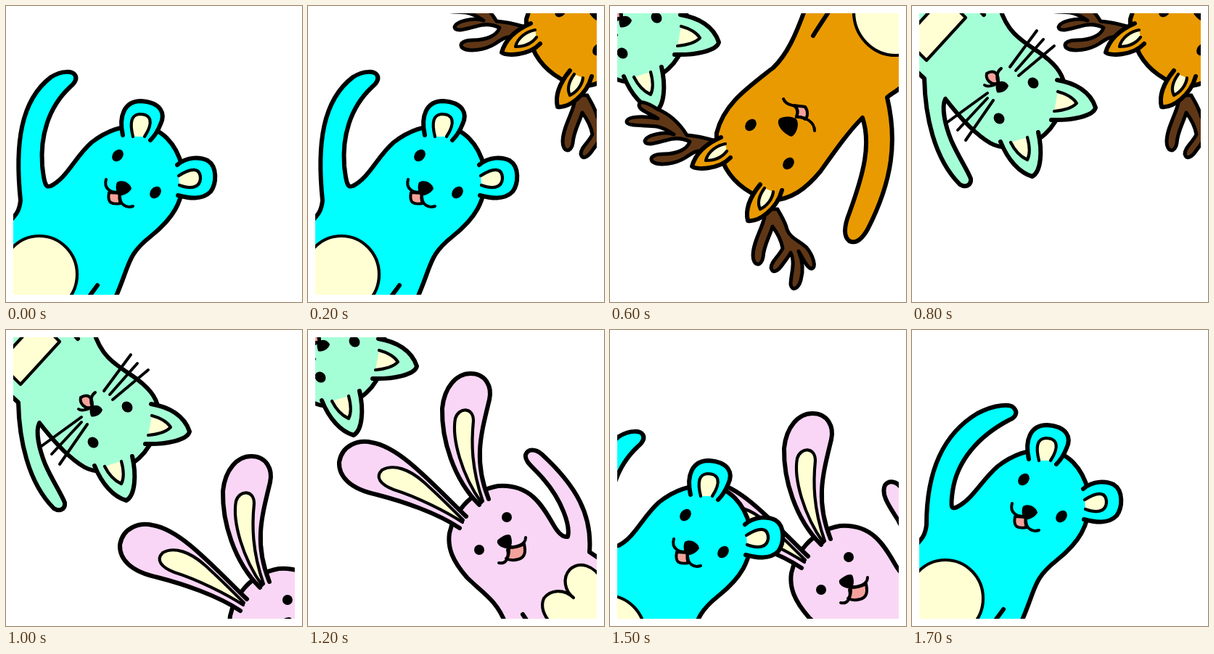
Animation of 408x408 px, one loop 1.8 s. Source, as an HTML page:

```html
<!DOCTYPE html>
<html lang="en">
<head>
<meta charset="utf-8">
<title>Waving animals</title>
<style>
  html, body { margin: 0; width: 100%; height: 100%; overflow: hidden; background: #fff; }
  body > svg { display: block; width: 100vw; height: 100vh; }

  path, ellipse { stroke: #000; stroke-width: 6; stroke-linecap: round; stroke-linejoin: round; }
  .skin { fill: var(--skin); }
  .cream { fill: #ffffd3; stroke-width: 4.2; }
  .tongue { fill: #f5a29c; stroke-width: 4; }
  .horn { fill: #5f3716; stroke-width: 5; }
  .ink { stroke: none; }
  .line { fill: none; }
  .thin { fill: none; stroke-width: 4; }

  .animal { animation: slide 1.8s step-end var(--at) infinite; }
  .rest { animation: rest 1.8s step-end var(--at) infinite; }
  .wave { animation: wave 1.8s step-end var(--at) infinite; }

  .bear   { --skin: #0ff;    --at: -.4s;  --in: -50px, 49px;     --in2: -100px, 98px;  --out: -57px, 54px;     --out2: -114px, 109px; animation-name: linger; }
  .deer   { --skin: #e99a00; --at: -1.6s; --in: 77px, -78px;     --in2: 154px, -157px; --out: 77px, -78px;     --out2: 154px, -157px; }
  .cat    { --skin: #a5ffd6; --at: -1.2s; --in: -52px, -45px;    --in2: -103px, -90px; --out: -52px, -45px;    --out2: -103px, -90px; }
  .rabbit { --skin: #f9d6f5; --at: -.8s;  --in: 57px, 57px;      --in2: 114px, 114px;  --out: 55px, 55px;      --out2: 110px, 110px; }

  /* one step is an eighteenth of the loop */
  @keyframes slide {
    0%     { transform: translate(var(--in2)); }
    5.555% { transform: translate(var(--in)); }
    11.11% { transform: none; }
    27.77% { transform: translate(var(--out)); }
    33.33% { transform: translate(var(--out2)); }
    38.88%, 100% { transform: translate(900px, 0); }
  }
  @keyframes linger {
    0%     { transform: translate(var(--in2)); }
    5.555% { transform: translate(var(--in)); }
    11.11% { transform: none; }
    38.88% { transform: translate(var(--out)); }
    44.44% { transform: translate(var(--out2)); }
    49.99%, 100% { transform: translate(900px, 0); }
  }
  @keyframes rest {
    0%, 22.22%, 33.33%, 100% { opacity: 1; }
    16.66%, 27.77% { opacity: 0; }
  }
  @keyframes wave {
    0%, 22.22%, 33.33%, 100% { opacity: 0; }
    16.66%, 27.77% { opacity: 1; }
  }
</style>
</head>
<body>
<svg viewBox="0 0 408 408">
<svg x="10" y="10" width="388" height="388" viewBox="10 10 388 388">

  <g class="animal rabbit">
    <path class="skin rest" d="M272 404C260 372 240 362 219 341C199 318 192 300 195 280C200 255 222 222 262 215C305 212 322 240 338 268C346 282 352 286 358 285C362 270 350 235 325 206C312 190 298 182 300 172C303 163 314 164 322 171C370 215 392 255 388 306L406 318V404Z"/>
    <path class="skin wave" d="M272 404C260 372 240 362 219 341C199 318 192 300 195 280C200 255 222 222 262 215C305 212 322 240 338 268C346 282 352 286 358 285C362 265 358 235 342 207C330 188 318 172 324 159C330 151 340 154 346 162C380 205 394 255 388 306L406 318V404Z"/>
    <path class="skin" d="M236 241C200 205 184 150 185 108C188 78 205 60 224 60C245 60 254 78 250 96C238 145 228 180 249 233"/>
    <path class="cream" d="M239 238C212 200 198 150 203 122C208 106 228 106 228 125C225 155 225 190 241 236"/>
    <path class="skin" d="M209 273C178 252 130 236 95 227C58 219 42 202 43 182C47 158 70 151 88 155C125 161 165 205 218 257"/>
    <path class="cream" d="M213 265C190 250 150 230 118 220C100 213 92 203 102 193C118 184 140 192 160 210C180 228 198 246 214 262"/>
    <path class="cream" d="M406 345C394 324 374 318 361 330C350 342 354 360 366 369C352 356 334 358 325 370C320 382 325 394 336 406H406Z"/>
    <path class="line" d="M296 392L304 404"/>
    <ellipse class="ink" cx="274" cy="258" rx="7" ry="7"/>
    <ellipse class="ink" cx="236" cy="303" rx="7" ry="7"/>
    <path class="tongue" d="M277 300C285 300 294 297 298 295C300 305 300 313 290 316C283 318 277 317 273 315C277 312 277 306 277 300Z"/>
    <path class="thin" d="M300 286C300 296 288 299 279 299M263 321C272 323 278 315 275 303"/>
    <path class="ink" d="M261 290C267 284 276 280 279 283C283 292 280 300 277 301C270 302 259 297 261 290Z"/>
  </g>

  <g class="animal cat">
    <path class="skin rest" d="M121 2C131 36 150 47 174 63C197 79 207 92 210 108C211 135 201 166 174 184C155 197 124 198 108 189C84 175 63 150 46 128C40 140 46 165 54 185C64 208 76 225 81 238C82 247 74 251 66 246C30 210 18 150 17 100L2 86V2Z"/>
    <path class="skin wave" d="M121 2C131 36 150 47 174 63C197 79 207 92 210 108C211 135 201 166 174 184C155 197 124 198 108 189C84 175 63 150 46 128C44 142 58 165 74 182C90 200 106 212 114 222C118 231 110 238 101 234C50 205 20 155 17 100L2 86V2Z"/>
    <path class="skin" d="M200 102C225 106 246 118 253 140C250 152 220 158 192 157"/>
    <path class="cream" d="M201 118C212 121 222 126 227 134C220 141 208 144 196 145"/>
    <path class="skin" d="M122 187C132 212 148 230 166 235C178 228 180 200 174 174"/>
    <path class="cream" d="M136 188C142 200 150 208 159 212C163 204 162 192 159 181"/>
    <path class="cream" d="M74 16L20 75L-10 45L44 -14Z"/>
    <path class="line" d="M92 4L99 12"/>
    <path class="thin" d="M172 34L135 84M181 46L143 89M196 55L147 96M104 120L49 160M104 127L63 171M112 130L74 185"/>
    <ellipse class="ink" cx="167" cy="106" rx="7" ry="8" transform="rotate(-42 167 106)"/>
    <ellipse class="ink" cx="120" cy="155" rx="7" ry="8" transform="rotate(-42 120 155)"/>
    <path class="tongue" d="M118 107C108 109 101 101 103 93C111 88 119 90 119 104Z"/>
    <path class="thin" d="M123 86C116 91 116 98 119 106M100 109C104 112 112 110 118 106"/>
    <path class="ink" d="M117 106C124 101 131 105 133 110C131 117 122 121 117 119C115 113 115 109 117 106Z"/>
  </g>

  <g class="animal deer">
    <path class="horn" d="M146 186C132 182 120 179 106 178C98 165 85 150 65 142C50 132 40 130 40 137C41 145 56 148 66 155C50 152 25 151 23 159C22 166 45 164 64 166C75 168 82 173 88 177C75 172 50 178 48 186C49 194 66 188 78 185C90 181 100 182 110 187C106 198 92 204 74 204C62 204 54 208 58 214C66 221 90 218 104 209C114 202 120 198 132 200Z"/>
    <path class="horn" d="M214 280C215 300 197 322 197 344C197 359 209 360 211 346C212 330 220 318 224 304C230 312 236 322 238 334C232 346 222 352 222 361C224 370 232 365 238 356C243 349 246 346 249 340C256 354 249 370 249 384C251 393 259 391 263 378C267 364 266 352 260 338C266 348 272 362 278 362C285 360 280 344 271 333C262 324 248 320 244 308C241 296 236 290 231 280Z"/>
    <path class="skin rest" d="M269 4C256 40 244 67 225 85C188 114 157 135 147 175C146 190 150 205 160 224C172 245 195 262 222 268C250 267 270 252 290 228C310 200 328 174 348 154C360 190 350 230 330 285C322 305 322 318 330 324C340 329 348 320 355 308C390 240 396 185 382 126C386 122 395 118 406 108V-4Z"/>
    <path class="skin wave" d="M269 4C256 40 244 67 225 85C188 114 157 135 147 175C146 190 150 205 160 224C172 245 195 262 222 268C250 267 270 252 290 228C310 200 328 174 348 154C352 190 338 225 302 272C292 286 290 300 297 307C306 313 316 306 325 296C378 240 392 185 382 126C386 122 395 118 406 108V-4Z"/>
    <path class="skin" d="M153 181C132 190 118 203 113 221C118 226 150 226 166 209"/>
    <path class="cream" d="M159 190C148 192 135 200 132 213C145 213 155 208 161 200"/>
    <path class="skin" d="M207 246C194 262 186 280 190 296C205 298 230 280 237 254"/>
    <path class="cream" d="M213 251C205 262 203 272 207 280C216 276 224 266 225 256"/>
    <ellipse class="cream" cx="394" cy="8" rx="58" ry="60"/>
    <path class="line" d="M304 4C295 18 288 28 280 41"/>
    <ellipse class="ink" cx="194" cy="164" rx="7" ry="9" transform="rotate(40 194 164)"/>
    <ellipse class="ink" cx="246" cy="217" rx="7" ry="9" transform="rotate(40 246 217)"/>
    <path class="tongue" d="M254 137C260 138 265 138 269 139C274 146 272 154 269 156C264 153 260 152 257 153C259 148 259 142 254 137Z"/>
    <path class="thin" d="M239 128C242 136 250 136 255 138C260 142 259 148 257 153M258 153C270 153 282 160 282 172"/>
    <path class="ink" d="M233 156C240 151 252 152 257 156C262 164 256 178 250 180C240 177 228 164 233 156Z"/>
  </g>

  <g class="animal bear">
    <path class="skin rest" d="M-6 310C10 290 18 288 20 268C12 190 20 130 62 98C78 88 92 90 95 95C99 101 94 107 88 112C58 140 47 180 50 220C53 250 56 250 62 248C85 236 95 208 118 188C140 171 160 165 185 165C215 168 235 190 243 222C250 270 225 297 200 317C165 345 172 355 150 404H-10Z"/>
    <path class="skin wave" d="M-6 310C10 290 18 288 20 268C20 200 40 145 90 115C115 102 135 102 140 107C147 114 142 121 134 124C92 146 62 180 56 222C53 244 54 248 62 244C85 232 95 208 118 188C140 171 160 165 185 165C215 168 235 190 243 222C250 270 225 297 200 317C165 345 172 355 150 404H-10Z"/>
    <path class="skin" d="M161 178C155 152 163 131 186 131C214 133 220 148 213 163C209 173 204 180 199 185"/>
    <path class="cream" d="M175 180C170 160 173 150 184 149C200 149 204 160 191 180"/>
    <path class="skin" d="M236 219C250 207 268 208 278 213C292 222 290 245 282 256C270 268 252 265 237 261"/>
    <path class="cream" d="M238 234C255 223 268 222 268 238C267 252 253 252 239 247"/>
    <ellipse class="cream" cx="46" cy="370" rx="52" ry="53"/>
    <path class="line" d="M126 385L112 404"/>
    <ellipse class="ink" cx="154" cy="206" rx="7" ry="9" transform="rotate(40 154 206)"/>
    <ellipse class="ink" cx="206" cy="257" rx="7" ry="9" transform="rotate(40 206 257)"/>
    <path class="tongue" d="M142 257C139 272 146 274 158 272C156 267 156 262 157 258Z"/>
    <path class="thin" d="M138 239C134 252 146 259 156 256M157 260C156 274 166 279 175 276"/>
    <path class="ink" d="M153 243C160 238 172 244 173 252C168 260 158 263 154 260C151 254 151 247 153 243Z"/>
  </g>

</svg>
</svg>
</body>
</html>
```
